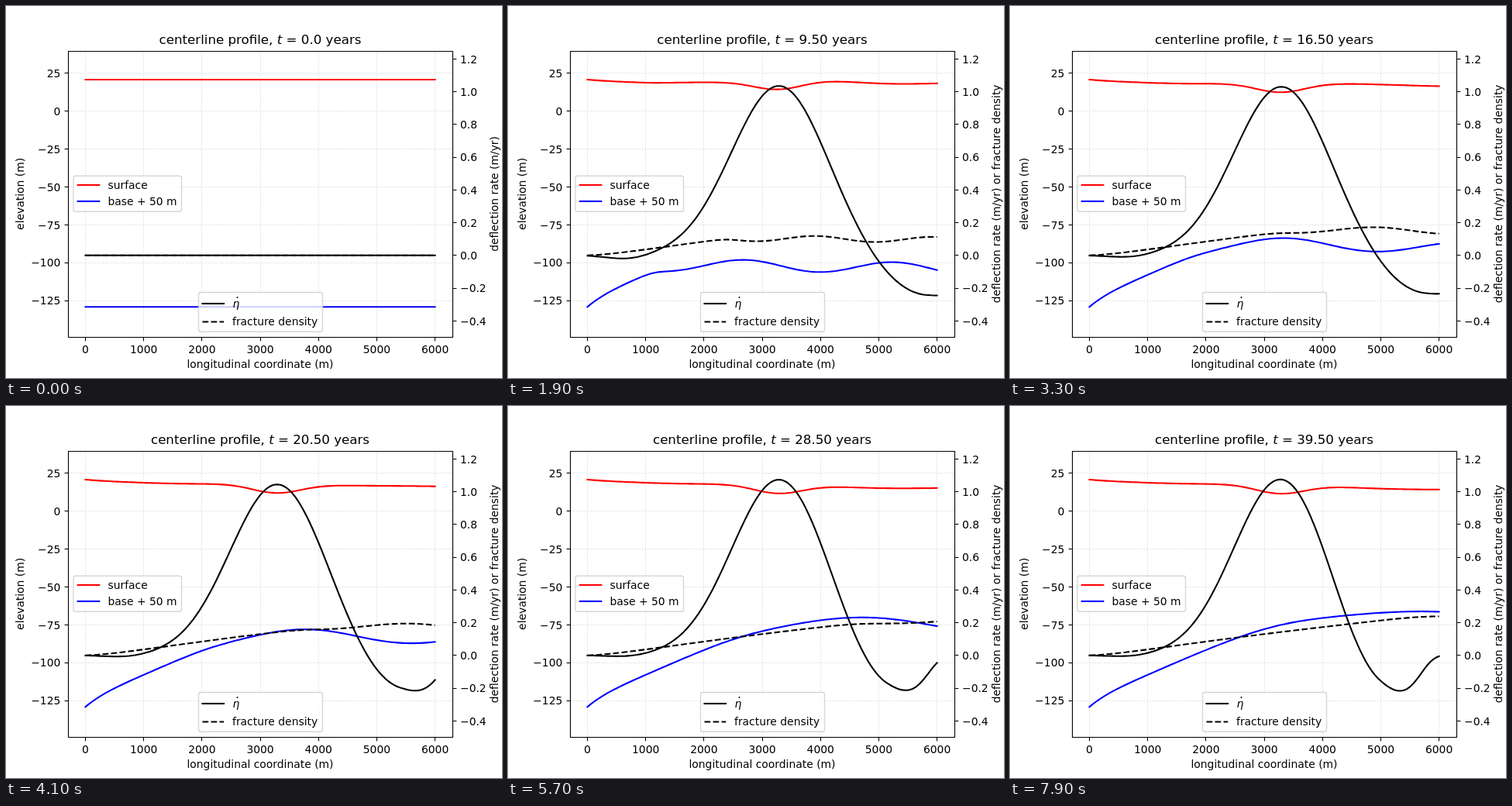
Recreate the animation shown at these times as an HTML page. Size 640 by 480 pixels, loop 8 s.

```html
<!DOCTYPE html>
<html lang="en">
<head>
<meta charset="utf-8">
<title>Centerline profile</title>
<style>
  html, body { margin: 0; width: 640px; height: 480px; overflow: hidden; background: #fff; }
  svg { display: block; }
  text { font: 13.89px "DejaVu Sans", sans-serif; }
  .title { font-size: 16.67px; }
  .it { font-style: oblique; }
  .mid { text-anchor: middle; }
  .end { text-anchor: end; }
  path { fill: none; stroke: #000; }
  .grid { stroke: #e6e6e6; stroke-dasharray: 2.57 1.11; }
  .tick { stroke-width: 1.1; }
  .curve { stroke-width: 2.08; stroke-linejoin: round; }
  .cap { stroke-linecap: square; }
  .red { stroke: #f00; }
  .blue { stroke: #00f; }
  .dash { stroke-dasharray: 7.71 3.33; }
  .box { fill: #fff; fill-opacity: .8; stroke: #ccc; stroke-opacity: .8; stroke-width: 1.39; }
</style>
</head>
<body>
<svg width="640" height="480" viewBox="0 0 640 480">
  <g id="grid"></g>
  <path id="surface" class="curve cap red"/>
  <path id="base" class="curve cap blue"/>
  <rect class="box" x="87" y="219.3" width="139.5" height="46" rx="2.8"/>
  <path class="curve cap red" d="M92.7 231H120.3"/>
  <path class="curve cap blue" d="M92.7 252H120.3"/>
  <text x="131.5" y="236">surface</text>
  <text x="131.5" y="257">base + 50 m</text>
  <path id="rate" class="curve cap"/>
  <path id="density" class="curve dash"/>
  <rect class="box" x="248.5" y="369.5" width="160" height="50.7" rx="2.8"/>
  <path class="curve cap" d="M253.5 384H281"/>
  <path class="curve dash" d="M253.5 407.5H281.2"/>
  <text class="it" x="292.5" y="388.5">η</text>
  <circle cx="298.5" cy="376" r="1"/>
  <text x="292" y="412">fracture density</text>
  <path class="tick" d="M80.5 58.5H576.5V427.5H80.5Z"/>
  <g id="ticks"></g>
  <text class="mid" x="328" y="467">longitudinal coordinate (m)</text>
  <text class="mid" transform="translate(23 242.4) rotate(-90)">elevation (m)</text>
  <text id="label" class="mid" transform="translate(635 242.4) rotate(-90)"></text>
  <text class="title mid" x="328" y="49">centerline profile, <tspan class="it">t</tspan> = <tspan id="years"></tspan> years</text>
</svg>
<script>
const $ = id => document.getElementById(id);
const { exp, cos, sin, PI } = Math;
const LEFT = 102.5, STEP = 37.59, CELLS = 12; // one cell is 500 m

const bell = (d, width) => exp(-d * d / (2 * width * width));
const settle = (t, years) => 1 - exp(-t / years);
const softMin = (a, b) => a * b / (a ** 10 + b ** 10) ** .1 || 0;

// Straight lines between [time, value] points.
function ramp(t, points) {
  let i = 1;
  while (i < points.length - 1 && t > points[i][0]) i++;
  const [t0, a] = points[i - 1], [t1, b] = points[i];
  return a + (b - a) * (t - t0) / (t1 - t0);
}

// A rising level with waves stretching downstream, capped by a steady profile.
function evolve(x, t, steady, { level, years, dip, growth, period, depth }) {
  const center = dip * exp(t / growth);
  const wave = (1 + cos(2 * PI * (x / center - 1) / period)) / 2;
  const free = level * settle(t, years) * (1 - .0006 * x * x) - depth * settle(t, 4) * wave;
  return softMin(steady, free);
}

const baseModel = { level: 170, years: 21, dip: 6, growth: 34, period: .65, depth: 16 };
const densityModel = { level: 74, years: 22, dip: 4.3, growth: 32, period: .7, depth: 8 };

function baseRise(x, t) {
  const steady = 134 * sin(PI * x / 22) + 5 * x * exp(1 - x);
  return evolve(x, t, steady, baseModel);
}

function densityRise(x, t) {
  const steady = 5.4 * x * x / (x + 1.6) + 2.3 * sin(PI * x / 8.5);
  return evolve(x, t, steady, densityModel);
}

function surfaceDrop(x, t) {
  const d = x - 6.55;
  return .105 * baseRise(x, t) + settle(t, 2) * (12 * bell(d, .85) - 5 * bell(d, 2));
}

// A hump, a small dip before it and a trough that wanders upstream behind it.
function rateRise(x, t) {
  if (!t) return 0;
  const height = ramp(t, [[0, 155], [2, 185], [5.5, 209], [9.5, 219], [16.5, 218], [28.5, 228], [40, 229]]);
  const hump = height * bell(x - 6.6 + .5 * exp(-t / 3), 1.64);
  const dip = (2 + 16 * exp(-t / 6)) * bell(x - 1.4, .7);
  const center = ramp(t, [[0, 12.3], [9.5, 11.6], [16.5, 11.5], [20.5, 10.75], [28.5, 10.25], [40, 9.9]]);
  const depth = ramp(t, [[0, 14], [5.5, 33], [9.5, 53], [20.5, 50], [40, 60]]);
  const d = x - center;
  const trough = depth * (d < 0 ? bell(d, center * .2 - .7) : exp(-((d / 1.55) ** 4)));
  return hump - dip - trough;
}

const curves = {
  surface: (x, t) => 95 + surfaceDrop(x, t),
  base: (x, t) => 388.3 - baseRise(x, t),
  rate: (x, t) => 321.7 - rateRise(x, t),
  density: (x, t) => 321.7 - densityRise(x, t)
};

function curvePath(height, t) {
  const points = [];
  for (let i = 0; i <= 120; i++) {
    const x = CELLS * i / 120;
    points.push(`${(LEFT + STEP * x).toFixed(2)} ${height(x, t).toFixed(2)}`);
  }
  return 'M' + points.join('L');
}

function drawAxes() {
  let grid = '', ticks = '';
  const snap = v => Math.floor(v) + .5;
  const line = (cls, d) => `<path class="${cls}" d="${d}"/>`;
  const label = (cls, x, y, s) =>
    `<text class="${cls}" x="${x}" y="${Math.round(y)}">${String(s).replace('-', '\u2212')}</text>`;
  for (let m = 0; m <= 6000; m += 1000) {
    const x = LEFT + STEP * m / 500, px = snap(x);
    grid += line('grid', `M${px} 427V58`);
    ticks += line('tick', `M${px} 427.5v4.9`) + label('mid', x, 448, m);
  }
  for (let e = -125; e <= 25; e += 25) {
    const y = 135.8 - e * 1.954, py = snap(y);
    grid += line('grid', `M80 ${py}H576`);
    ticks += line('tick', `M80.5 ${py}h-4.9`) + label('end', 70.3, y + 5.2, e);
  }
  for (let i = -2; i <= 6; i++) {
    const y = 321.8 - i * 42.25;
    ticks += line('tick', `M576.5 ${snap(y)}h4.9`) + label('', 586, y + 5.2, (i / 5).toFixed(1));
  }
  $('grid').innerHTML = grid;
  $('ticks').innerHTML = ticks;
}

let shown = -1;
function draw(now) {
  const step = Math.floor(now / 100) % 80;
  if (step !== shown) {
    shown = step;
    const year = step / 2;
    for (const id in curves) $(id).setAttribute('d', curvePath(curves[id], year));
    $('years').textContent = year ? year.toFixed(2) : '0.0';
    $('label').textContent = 'deflection rate (m/yr)' + (year ? ' or fracture density' : '');
  }
  requestAnimationFrame(draw);
}

drawAxes();
draw(performance.now());
</script>
</body>
</html>
```
